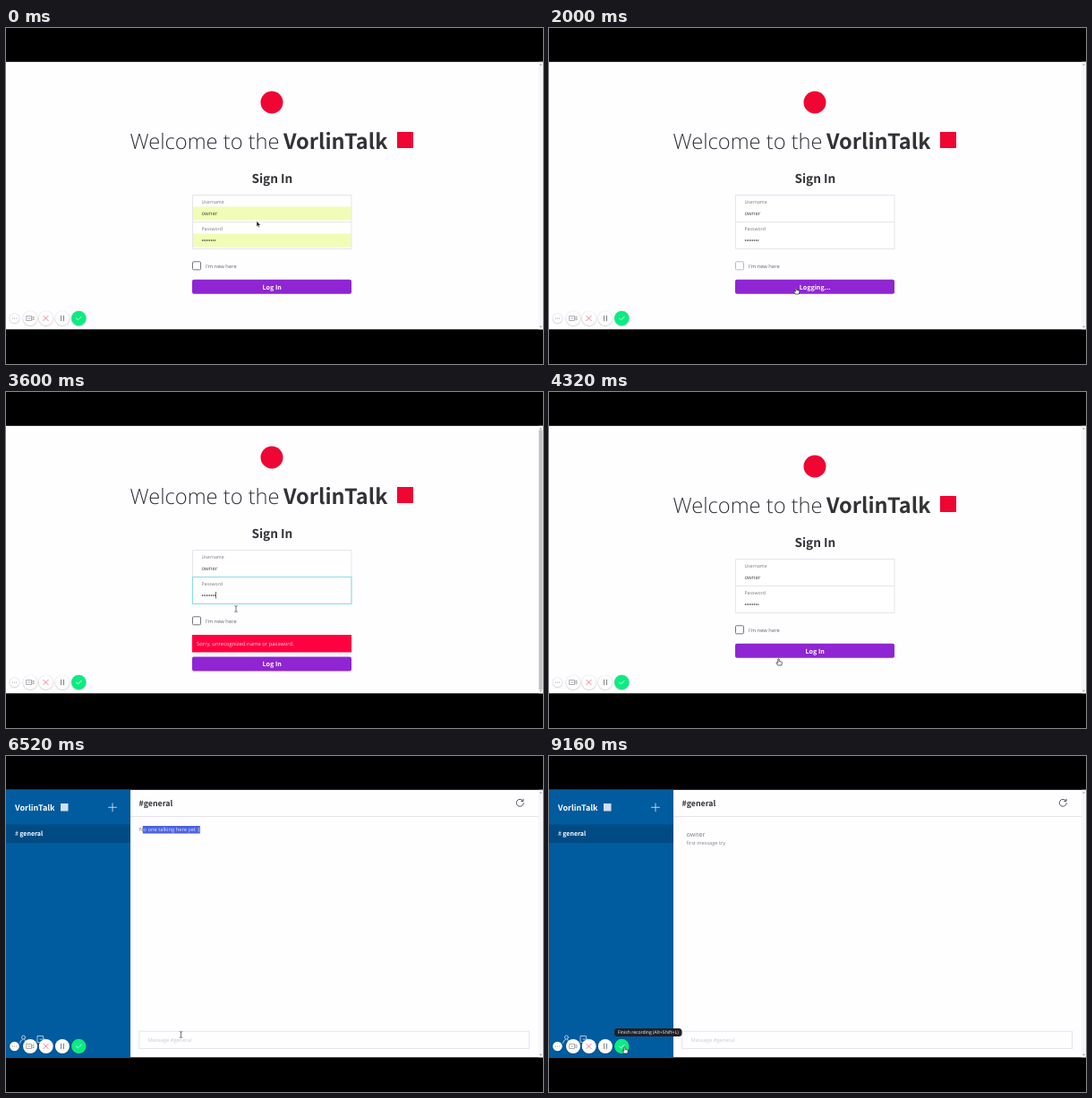
An HTML page that plays this animation: 600x375 px, repeating every 9280 ms.

```html
<!DOCTYPE html>
<html lang="en">
<head>
<meta charset="utf-8">
<title>Chat sign-in</title>
<style>
  html, body { margin: 0; width: 100%; height: 100%; overflow: hidden; background: #000; }
  svg { display: block; width: 100vw; height: 100vh; }
  text { font-family: "Open Sans", "Noto Sans", sans-serif; font-size: 5.8px; fill: #666; white-space: pre; text-rendering: geometricPrecision; }
  .bold { font-family: "Noto Sans CJK JP", "Noto Sans CJK SC", "Open Sans", sans-serif; font-weight: 700; fill: #333; }
  .label { font-size: 5.2px; fill: #777; }
  .value { font-size: 6.1px; fill: #444; }
  .dots { font-size: 5.3px; fill: #333; stroke: currentColor; stroke-width: .2; }
  .fill { fill: #f1fcb6; }
  .edge { fill: none; stroke: #e6e4e9; }
  .focus { fill: none; stroke: #86dde4; }
  .select { fill: #4b63e0; }
  .icon { fill: none; stroke-linecap: round; stroke-linejoin: round; }
</style>
</head>
<body>
<svg viewBox="0 0 600 375">
  <rect width="600" height="375"/>
  <rect y="37.8" width="600" height="298.5" fill="#fefdff"/>

  <g id="login">
    <g id="top">
      <circle cx="297" cy="83" r="12.5" fill="#ef0632"/>
      <text x="138.5" y="135" style="font-size:23.7px;font-weight:300;fill:#333">Welcome to the</text>
      <text class="bold" x="310" y="135" style="font-size:23.5px">VorlinTalk</text>
      <rect x="437" y="116" width="18" height="18" fill="#ef0632"/>
      <text class="bold" x="297.3" y="173" text-anchor="middle" style="font-size:13.6px">Sign In</text>

      <rect x="208.5" y="186.5" width="177.5" height="60" fill="#fff"/>
      <rect id="nameFill" class="fill" x="209" y="199.5" width="176.5" height="15"/>
      <rect id="passFill" class="fill" x="209" y="229.5" width="176.5" height="15"/>
      <path class="edge" d="M208.5 186.5H386V246.5H208.5ZM208.5 216.5H386"/>
      <rect id="nameFocus" class="focus" x="208.5" y="186.5" width="177.5" height="30"/>
      <rect id="passFocus" class="focus" x="208.5" y="216.5" width="177.5" height="30"/>
      <text class="label" x="218.5" y="196.2">Username</text>
      <text class="label" x="218.5" y="226.2">Password</text>
      <text id="name" class="value" x="218.5" y="209"></text>
      <rect id="passSelect" class="select" x="218.3" y="232.5" width="16.4" height="8.5"/>
      <text id="pass" class="dots" x="218.5" y="238.8"></text>

      <rect id="check" x="208.5" y="260.8" width="9" height="9" rx="1" fill="#fff" stroke="#777"/>
      <text x="223" y="267.7">I'm new here</text>
    </g>
    <g id="error">
      <rect x="208" y="271" width="178" height="19.5" fill="#ff0040"/>
      <text x="213" y="283" style="font-size:5.9px;fill:#ffe3ea">Sorry, unrecognized name or password.</text>
    </g>
    <g id="button">
      <rect x="208" y="280.8" width="178" height="16" rx="2" fill="#8f25d3"/>
      <text id="action" class="bold" x="297.2" y="291.8" text-anchor="middle" style="font-size:7.1px;fill:#fff"></text>
    </g>
  </g>

  <g id="chat">
    <rect y="37.8" width="139" height="298.5" fill="#005b9f"/>
    <rect y="76.5" width="139" height="20.5" fill="#014b84"/>
    <text class="bold" x="10" y="60.6" style="font-size:9px;fill:#fff">VorlinTalk</text>
    <rect x="61" y="53" width="8.5" height="8.5" fill="#cfe0ee"/>
    <path class="icon" d="M114.5 57.3H123.5M119 52.8V61.8" stroke="#e4eff7" stroke-width=".8"/>
    <text class="bold" x="10" y="89.4" style="font-size:7px;fill:#fff"><tspan style="font-weight:400">#</tspan><tspan x="15.3">general</tspan></text>
    <g class="icon" stroke="#cfe0ee" stroke-width=".8">
      <circle cx="19.5" cy="314" r="2"/>
      <path d="M15.5 320.5Q16 317 18.5 316.5M20.5 316.5Q23 317 23.5 320.5M41.5 314.5V312.5H35V319.5H41.5V318M38 316.2H43L41.5 314.7M43 316.2L41.5 317.7"/>
    </g>
    <text class="bold" x="148.5" y="55.8" style="font-size:8.8px">#general</text>
    <path d="M139 67.5H595" class="edge"/>
    <path class="icon" d="M577.3 49.6A4 4 0 1 0 578.3 52.6M578 48.2V50.5H575.7" stroke="#444" stroke-width=".9"/>
    <g id="empty">
      <text x="149" y="84.2">No one talking here yet :(</text>
      <g id="chatSelect">
        <rect id="selectBar" class="select" x="152.8" y="78" height="8.5"/>
        <svg id="selectClip" x="152.8" y="78" height="8.5"><text x="-3.8" y="6.2" style="fill:#dfe4ff">No one talking here yet :(</text></svg>
      </g>
    </g>
    <g id="post">
      <text x="153.5" y="89.5" style="font-size:7.1px;fill:#777">owner</text>
      <text x="153.5" y="98.6" style="font-size:5.65px;fill:#888">first message try</text>
    </g>
    <rect class="edge" x="148.8" y="307.2" width="435.7" height="19.3"/>
    <rect id="chatFocus" class="focus" x="148.8" y="307.2" width="435.7" height="19.3"/>
    <text id="hint" x="158.5" y="318.8" style="fill:#ccc">Message #general</text>
    <text id="draft" x="158.5" y="318.8" style="fill:#444"></text>
  </g>
  <rect id="caret" width=".7" fill="#333"/>

  <rect x="595" y="37.8" width="5" height="298.5" fill="#f6f5f7"/>
  <rect id="thumb" x="595.5" y="42.5" width="4" height="289.5" fill="#bfbec1"/>
  <path d="M596 41.5L597.5 39.8L599 41.5ZM596 332.8L597.5 334.5L599 332.8Z" fill="#999"/>

  <g id="tools">
    <g id="discs"></g>
    <g fill="#999"><circle cx="7.5" cy="324" r=".6"/><circle cx="9.5" cy="324" r=".6"/><circle cx="11.5" cy="324" r=".6"/></g>
    <g class="icon" stroke-width=".8">
      <path d="M23 321.5H28.5V326.5H23ZM28.5 323.5L31 322V326L28.5 324.5M24.8 324H26.7" stroke="#999"/>
      <path d="M41.8 321.3L47.2 326.7M47.2 321.3L41.8 326.7" stroke="#f0607a"/>
      <path d="M61.5 321.2V326.8M64.5 321.2V326.8" stroke="#777" stroke-width=".9"/>
      <path d="M78.6 324.2L80.6 325.8L84 322.4" stroke="#fff" stroke-width=".9"/>
    </g>
    <g id="tip">
      <rect x="73" y="304" width="75.5" height="9" rx="3.5" fill="#202024"/>
      <text x="110.8" y="310.4" text-anchor="middle" style="font-size:5.1px;fill:#fff">Finish recording (Alt+Shift+L)</text>
    </g>
  </g>

  <g id="cursor">
    <path id="arrow" d="M0 0V6.2L1.5 4.9L2.5 7L3.5 6.5L2.6 4.5H4.5Z" fill="#111" stroke="#fff" stroke-width=".5"/>
    <path id="beam" class="icon" d="M-1.3 -3.4Q0 -3.4 0 -2.5Q0 -3.4 1.3 -3.4M0 -2.5V2.5M-1.3 3.4Q0 3.4 0 2.5Q0 3.4 1.3 3.4" stroke="#444" stroke-width=".7"/>
    <path id="hand" d="M-.7 .6Q0 -.5 .7 .6V3L3.3 3.6Q4 3.9 3.8 5L3.2 7.5H-.8L-2.5 4.8Q-2.4 3.9 -1.5 4.3L-.7 5Z" fill="#fff" stroke="#222" stroke-width=".7"/>
  </g>
</svg>

<script>
const LOOP = 9280, FADE = 160, STEP = 40;
const USER = "owner", DOTS = "•".repeat(8), MESSAGE = "first message try";
const el = {};
document.querySelectorAll("[id]").forEach(n => el[n.id] = n);

// time, x, y, pointer shape from here on
const path = [
  [0, 280, 215.5, "arrow"], [80, 279, 214, "arrow"], [160, 272, 207, "beam"],
  [320, 271, 206, "beam"], [1400, 271, 206, "beam"], [1560, 274, 240, "arrow"],
  [1760, 276, 287, "hand"], [1880, 276, 289.5, "hand"], [2440, 276, 289.5, "arrow"],
  [2680, 262, 246, "beam"], [2840, 257, 230, "beam"], [3560, 257, 230, "beam"],
  [3660, 257, 260, "arrow"], [3780, 256.5, 295.5, "hand"], [3840, 256.5, 297.5, "hand"],
  [4600, 256.5, 297.5, "arrow"], [5000, 236, 215, "arrow"], [5360, 165, 95, "beam"],
  [5560, 152.8, 82, "beam"], [5720, 152.8, 82, "beam"], [6080, 219, 83, "beam"],
  [6160, 219, 86, "arrow"], [6440, 197, 300, "arrow"], [6480, 195.5, 311, "beam"],
  [7720, 195.5, 311, "arrow"], [8080, 203, 57, "arrow"], [8320, 176, 94, "beam"],
  [8640, 190, 88, "arrow"], [8940, 82, 332, "arrow"], [9040, 83, 327, "hand"],
  [9160, 84.5, 324.5, "hand"], [LOOP, 84.5, 324.5, "hand"]
];

const clamp = v => Math.max(0, Math.min(1, v));
const within = (t, a, b) => t >= a && t < b;
const show = (node, on) => node.style.display = on ? "" : "none";
const glow = (t, on, off) => clamp((t - on) / FADE) - clamp((t - off) / FADE);
const shift = (node, y) => node.setAttribute("transform", `translate(0 ${y})`);
const typed = (s, t, a, b) => s.slice(0, Math.ceil(clamp((t - a + STEP) / (b - a)) * s.length));
const setText = (node, s) => { if (node.textContent !== s) node.textContent = s; };

function disc(x, r, color) {
  const add = (dy, radius, fill, opacity) => {
    const c = document.createElementNS("http://www.w3.org/2000/svg", "circle");
    const a = { cx: x, cy: 324 + dy, r: radius, fill, opacity };
    for (const k in a) c.setAttribute(k, a[k]);
    el.discs.append(c);
  };
  add(.5, r + .9, "#000", .07);
  add(.3, r + .4, "#000", .1);
  add(0, r, color, 1);
}
disc(9.5, 5.3, "#fff");
[27, 44.7, 62.9].forEach(x => disc(x, 8, "#fff"));
disc(81.3, 8.2, "#0aec82");

function pointer(t) {
  let i = 0;
  while (i < path.length - 2 && t >= path[i + 1][0]) i++;
  const [t0, x0, y0, shape] = path[i], [t1, x1, y1] = path[i + 1];
  const k = clamp((t - t0) / (t1 - t0));
  return { x: x0 + (x1 - x0) * k, y: y0 + (y1 - y0) * k, shape };
}

function placeCaret(t, dy) {
  let box = null;
  if (within(t, 400, 760)) box = [el.name, 203, 7.5];
  else if (within(t, 1000, 1840) || within(t, 3120, 3880)) box = [el.pass, 233 + dy, 7.5];
  else if (within(t, 6600, 7560)) box = [el.draft, 312, 8.5];
  show(el.caret, box);
  if (!box) return;
  const [node, y, h] = box;
  const w = node.textContent ? node.getComputedTextLength() : 0;
  el.caret.setAttribute("x", +node.getAttribute("x") - .3 + w);
  el.caret.setAttribute("y", y);
  el.caret.setAttribute("height", h);
}

function draw(t) {
  const inChat = t >= 4640;
  const failed = within(t, 2400, 4320);
  const busy = within(t, 1880, 2400) || within(t, 3880, 4320);
  const dy = failed ? -10 : 0;
  const p = pointer(t);

  show(el.login, !inChat);
  show(el.chat, inChat);
  show(el.error, failed);
  show(el.thumb, failed);
  shift(el.top, dy);
  shift(el.button, failed ? 14.7 : 0);
  setText(el.action, busy ? "Logging..." : "Log In");
  el.check.setAttribute("stroke", busy ? "#bbb" : "#777");

  show(el.nameFill, t < 400);
  show(el.passFill, t < 1000);
  el.nameFocus.style.opacity = glow(t, 240, 780);
  el.passFocus.style.opacity = glow(t, 800, 1840) + glow(t, 2880, 3880);
  setText(el.name, t < 400 ? USER : typed(USER, t, 400, 720));
  setText(el.pass, t < 1000 ? DOTS : t < 3120 ? typed(DOTS, t, 1000, 1400) : typed(DOTS, t, 3120, 3560));
  const picked = within(t, 780, 1000) || within(t, 2960, 3120);
  show(el.passSelect, picked);
  el.pass.style.fill = el.pass.style.color = picked ? "#dfe4ff" : "#333";

  show(el.empty, t < 7720);
  show(el.post, t >= 7720);
  const span = t < 6080 ? Math.max(0, Math.min(64, p.x - 152.8)) : 64;
  show(el.chatSelect, within(t, 5720, 6560) && span > 0);
  el.selectBar.setAttribute("width", span);
  el.selectClip.setAttribute("width", span);
  el.chatFocus.style.opacity = glow(t, 6520, 7720);
  const draft = within(t, 6680, 7360) ? typed(MESSAGE, t, 6680, 7300) : "";
  setText(el.draft, draft);
  show(el.hint, !draft);
  placeCaret(t, dy);

  show(el.tip, t >= 9040);
  const hidden = within(t, 400, 760) || within(t, 1000, 1400) || within(t, 3120, 3560) || within(t, 6680, 7720);
  show(el.cursor, !hidden);
  el.cursor.setAttribute("transform", `translate(${p.x} ${p.y})`);
  for (const s of ["arrow", "beam", "hand"]) show(el[s], s === p.shape);
}

const start = performance.now();
function tick() {
  const t = (performance.now() - start) % LOOP;
  draw(Math.floor(t / STEP) * STEP);
  requestAnimationFrame(tick);
}
tick();
</script>
</body>
</html>
```
